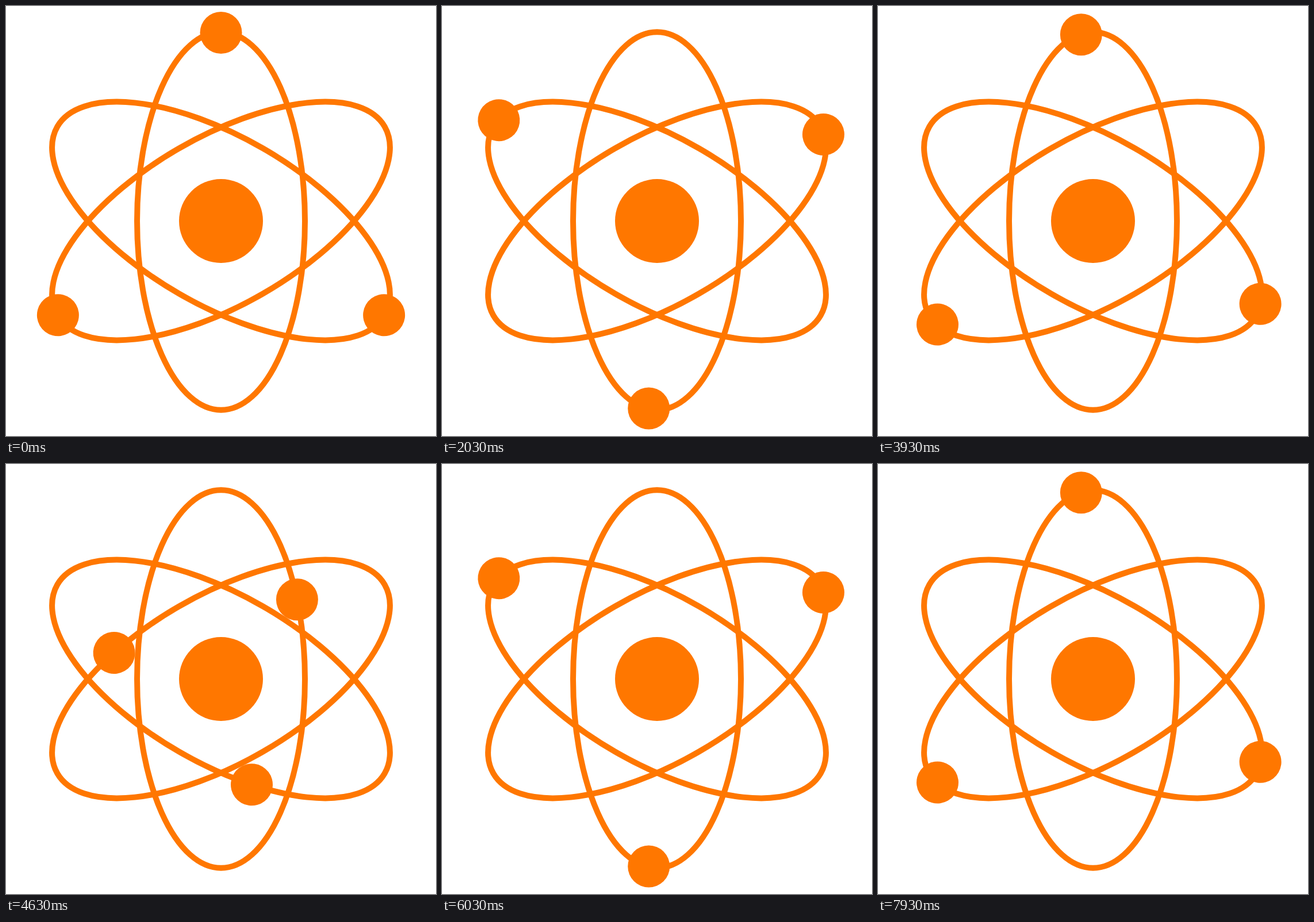
Animation of 748 by 748 pixels, one loop 8.01 s. Source, as an HTML page:

```html
<!DOCTYPE html>
<html lang="en">
<head>
<meta charset="utf-8">
<title>Atom</title>
<style>
  html, body { margin: 0; width: 100%; height: 100%; overflow: hidden; background: #fff; }
  svg { display: block; width: 100%; height: 100%; }
  .orbit { fill: none; stroke: #ff7700; stroke-width: 10; }
  .ball { fill: #ff7700; }
</style>
</head>
<body>
<svg viewBox="0 0 748 748">
  <defs>
    <path id="track" d="M0-327.5A146 327.5 0 0 1 0 327.5A146 327.5 0 0 1 0-327.5"/>
    <g id="arm">
      <ellipse class="orbit" rx="146" ry="328.7"/>
      <circle id="electron" class="ball" cy="-327.5" r="36.5"/>
    </g>
  </defs>
  <g transform="translate(374 374)">
    <use href="#arm"/>
    <use href="#arm" transform="rotate(120)"/>
    <use href="#arm" transform="rotate(240)"/>
    <circle class="ball" r="73"/>
  </g>
</svg>
<script>
  const LOOP = 8010, TURN = 120;
  const track = document.getElementById('track');
  const electron = document.getElementById('electron');
  const length = track.getTotalLength();

  // [tick, share of the orbit travelled]
  const keys = [[0, 0], [7, .0533], [40, .3534], [51, .4358], [58, .4855],
                [82, .7066], [101, .8871], [109, .9343], [118, .9864], [120, 1]];
  const last = keys.length - 1;

  const slope = i => (keys[i + 1][1] - keys[i][1]) / (keys[i + 1][0] - keys[i][0]);

  // Speed at a key, weighted towards its shorter neighbour
  function speed(i) {
    const a = (i + last - 1) % last, b = i % last;
    const wa = keys[a + 1][0] - keys[a][0], wb = keys[b + 1][0] - keys[b][0];
    return (slope(a) * wb + slope(b) * wa) / (wa + wb);
  }

  function travelled(tick) {
    let i = 0;
    while (i < last - 1 && tick >= keys[i + 1][0]) i++;
    const [x0, y0] = keys[i], [x1, y1] = keys[i + 1];
    const w = x1 - x0, u = (tick - x0) / w, v = 1 - u;
    return y0 * v * v * (1 + 2 * u) + y1 * u * u * (3 - 2 * u)
      + w * u * v * (speed(i) * v - speed(i + 1) * u);
  }

  // Thirty ticks a second, every third one skipped
  function tickAt(ms) {
    const t = Math.min(ms % LOOP, 7999);
    return (3 * Math.floor(t / 100) + (t % 100 >= 30 ? 1 : 0)) % TURN;
  }

  function draw() {
    const tick = tickAt(performance.now());
    const p = track.getPointAtLength(travelled(tick) * length);
    const bulge = 1 + .017 * Math.exp(-(((tick - 40) / 8) ** 2));
    electron.setAttribute('cx', p.x * bulge);
    electron.setAttribute('cy', p.y * bulge);
    requestAnimationFrame(draw);
  }
  draw();
</script>
</body>
</html>
```
